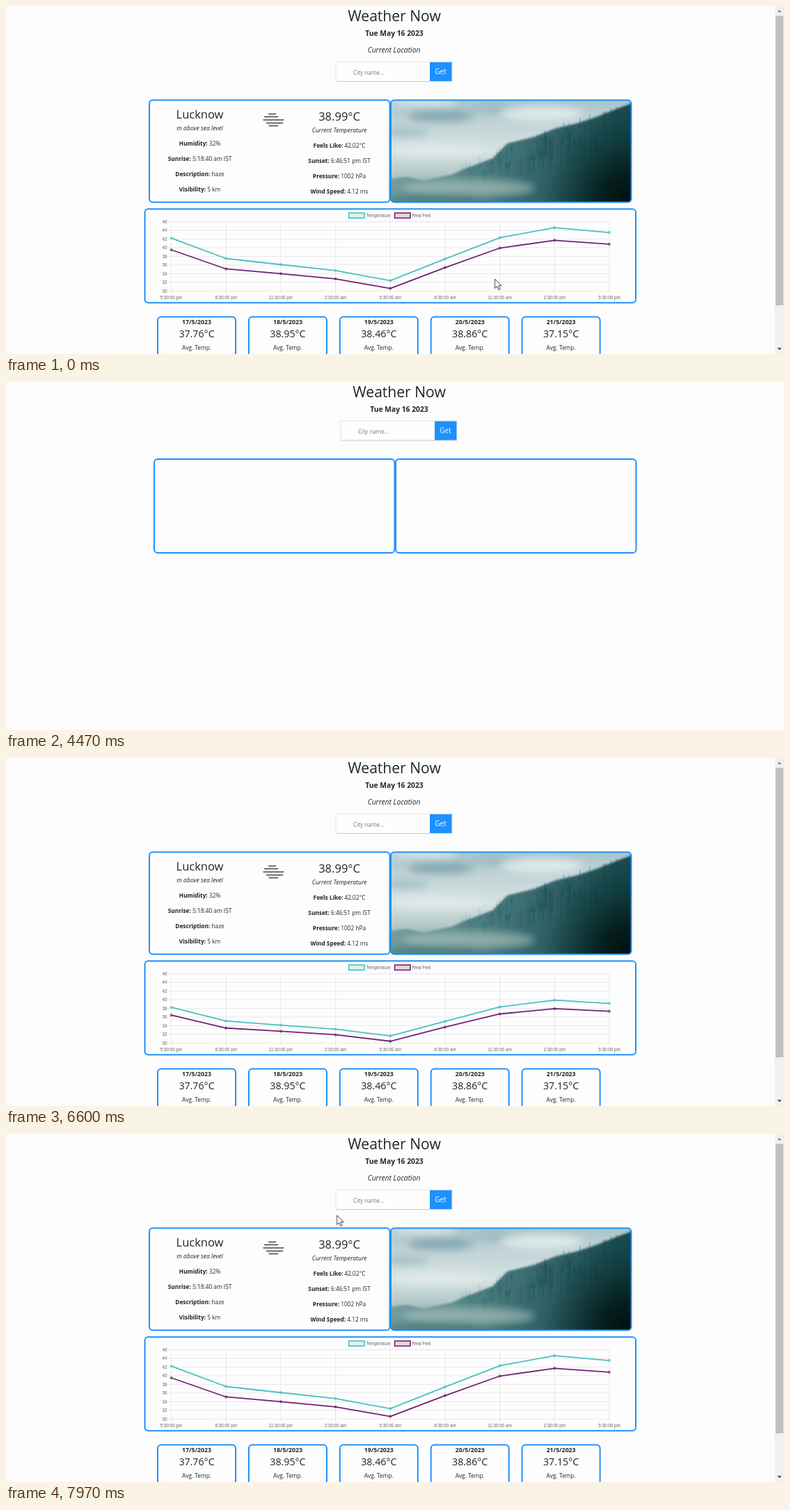
An HTML page that plays this animation: 1118 by 501 pixels, repeating every 8000 ms.

```html
<!DOCTYPE html>
<html lang="en">
<head>
<meta charset="utf-8">
<title>Weather Now</title>
<style>
  html, body { margin: 0; width: 100%; height: 100%; overflow: hidden; background: #fdfdfd; }
  svg { display: block; width: 1118px; height: 501px; }
  text { font: 8.3px "Open Sans", "Noto Sans", sans-serif; fill: #212529; text-anchor: middle; }
  .title { font-size: 21.1px; font-weight: 500; }
  .date { font-size: 10.3px; font-weight: 700; }
  .place { font-size: 10.3px; font-style: italic; }
  .hint { font-size: 8.1px; fill: #777; text-anchor: start; }
  .get { font-size: 10px; fill: #fff; }
  .big { font-size: 16.5px; font-weight: 500; }
  .sub { font-size: 8.6px; font-style: italic; }
  .bold { font-weight: 700; }
  .day { font-size: 8.7px; font-weight: 700; }
  .avg { font-size: 14.2px; font-weight: 500; }
  .tick { font: 6.3px "Liberation Sans", Arial, sans-serif; fill: #666; }
  .start { text-anchor: start; }
  .end { text-anchor: end; }
  .frame { fill: none; stroke: #1e90ff; stroke-width: 2; }
  .grid { fill: none; stroke: #dedede; stroke-width: .7; }
  .line { fill: none; stroke-width: 1.8; stroke-linejoin: round; }

  #page, #search, #blank, #photo, #pointer, .data, .late, #chart {
    animation: 8s step-end infinite;
  }
  #page { animation-name: shift; }
  #search { animation-name: lift; }
  #blank { animation-name: blank; }
  .data { animation-name: data; }
  #photo { animation-name: photo; }
  .late { animation-name: late; }
  #chart { animation-name: chart; }
  #pointer { animation-name: pointer; }

  @keyframes shift {
    0%, 77.875%, 100% { transform: none; }
    55.875% { transform: translateX(7px); }
  }
  @keyframes lift {
    0%, 59.625%, 100% { transform: none; }
    55.875% { transform: translateY(-24.5px); }
  }
  @keyframes blank {
    0%, 59.625%, 100% { opacity: 0; }
    55.875% { opacity: 1; }
  }
  @keyframes data {
    0%, 59.625%, 100% { opacity: 1; }
    55.875% { opacity: 0; }
  }
  @keyframes photo {
    0%, 60%, 100% { opacity: 1; }
    55.875% { opacity: 0; }
  }
  @keyframes late {
    0%, 77.875%, 100% { opacity: 1; }
    55.875% { opacity: 0; }
  }
  @keyframes chart {
    0%, 78.625%, 100% { opacity: 1; }
    55.875% { opacity: 0; }
  }
  @keyframes pointer {
    0% { opacity: 1; transform: translate(702.5px, 393px); }
    23.375% { opacity: 0; transform: translate(702.5px, 393px); }
    96.625% {
      opacity: 1; transform: translate(702.5px, 393px);
      animation-timing-function: cubic-bezier(.3, .3, .5, 1);
    }
    99.625%, 100% { opacity: 1; transform: translate(475.5px, 117px); }
  }
</style>
</head>
<body>
<svg viewBox="0 0 1118 501">
  <defs>
    <linearGradient id="sky" x2="0" y2="1">
      <stop offset="0" stop-color="#a9c4c9"/>
      <stop offset=".25" stop-color="#c3d5d8"/>
      <stop offset=".5" stop-color="#d6e2e2"/>
      <stop offset=".72" stop-color="#b3c9c8"/>
      <stop offset="1" stop-color="#5d8888"/>
    </linearGradient>
    <linearGradient id="wood" x2="1" y2=".15">
      <stop offset="0" stop-color="#84aaaa"/>
      <stop offset=".45" stop-color="#4c7e81"/>
      <stop offset="1" stop-color="#154448"/>
    </linearGradient>
    <radialGradient id="dark" gradientUnits="userSpaceOnUse" cx="897" cy="284" r="125">
      <stop offset="0" stop-color="#010b0b"/>
      <stop offset=".35" stop-color="#031817" stop-opacity=".85"/>
      <stop offset="1" stop-color="#0a2c2d" stop-opacity="0"/>
    </radialGradient>
    <filter id="soft" x="-30%" y="-60%" width="160%" height="220%"><feGaussianBlur stdDeviation="6"/></filter>
    <filter id="edge" x="-5%" y="-5%" width="110%" height="110%"><feGaussianBlur stdDeviation="1.6"/></filter>
    <clipPath id="crop"><rect x="553" y="135.5" width="345.5" height="147" rx="5"/></clipPath>
  </defs>

  <g id="page">
    <text class="title" x="558" y="22">Weather Now</text>
    <text class="date" x="558" y="43">Tue May 16 2023</text>
    <text class="place data" x="557.5" y="67">Current Location</text>

    <g id="search">
      <rect x="474" y="80.5" width="167" height="28" fill="#fefefe" stroke="#e2e2e8"/>
      <path d="M474 108.7H641" stroke="#c9cbd6"/>
      <rect x="609" y="81" width="31.5" height="27" fill="#1e90ff"/>
      <text class="hint" x="499" y="98.5">City name...</text>
      <text class="get" x="624.5" y="98.4">Get</text>
    </g>

    <g id="blank" class="frame">
      <rect x="206" y="111" width="345.5" height="135" rx="5"/>
      <rect x="553" y="111" width="345.5" height="135" rx="5"/>
    </g>

    <g id="photo" clip-path="url(#crop)">
      <rect x="553" y="135" width="346" height="148" fill="url(#sky)"/>
      <g filter="url(#soft)">
        <ellipse cx="625" cy="158" rx="48" ry="9" fill="#86a9b3"/>
        <ellipse cx="705" cy="148" rx="38" ry="6" fill="#9ab9c1"/>
        <ellipse cx="575" cy="182" rx="34" ry="6" fill="#a3bfc5"/>
        <ellipse cx="600" cy="138" rx="50" ry="6" fill="#dfe9ea"/>
        <ellipse cx="770" cy="155" rx="60" ry="10" fill="#dfe9e9"/>
        <ellipse cx="620" cy="208" rx="70" ry="11" fill="#dde7e6"/>
      </g>
      <g filter="url(#edge)">
        <path d="M548 250L575 246 600 251 640 243 660 234 700 219 720 198 760 188 790 176 820 169 850 159 880 147 905 138V290H548Z" fill="url(#wood)"/>
      </g>
      <g id="trees" fill="none" stroke="#174a4e"/>
      <ellipse cx="665" cy="262" rx="95" ry="13" fill="#b4cac5" opacity=".6" filter="url(#soft)"/>
      <ellipse cx="610" cy="280" rx="70" ry="8" fill="#426f70" opacity=".6" filter="url(#soft)"/>
      <rect x="770" y="150" width="130" height="134" fill="url(#dark)"/>
    </g>

    <g class="data">
      <rect class="frame" x="206" y="135.5" width="345.5" height="147" rx="5"/>
      <rect class="frame" x="553" y="135.5" width="345.5" height="147" rx="5"/>
      <path d="M377 155.5H388M371 159.5H391M369.5 164H399M374 168.5H398M377.5 172.5H391" stroke="#444" stroke-width="1.6"/>
      <g id="facts"></g>
    </g>

    <g class="late">
      <rect class="frame" x="199.5" y="292.3" width="705.5" height="135" rx="5"/>
      <g id="cards"></g>
      <rect x="1105" width="13" height="501" fill="#f1f1f1"/>
      <rect x="1106" y="14" width="11" height="417" fill="#c1c1c1"/>
      <path d="M1108.5 9L1111.5 5.5 1114.5 9Z" fill="#8a8a8a"/>
      <path d="M1108.5 492L1111.5 495.5 1114.5 492Z" fill="#505050"/>
    </g>

    <g id="chart">
      <g id="axes"></g>
      <g id="plot"></g>
    </g>
  </g>

  <path id="pointer" d="M0 0V13.5L3.2 10.6 5.3 15.6 7.6 14.6 5.5 9.7H9.6Z" fill="#fff" stroke="#222" stroke-width=".9"/>
</svg>

<script>
const $ = id => document.getElementById(id);
const text = (x, y, str, cls = "") => `<text class="${cls}" x="${x}" y="${y}">${str}</text>`;

// Weather details
const fact = (x, y, [name, value]) =>
  text(x, y, `<tspan class="bold">${name}:</tspan> ${value}`);
const column = (x, y, head, sub, rows) =>
  text(x, y, head, "big") + text(x, y + 17.3, sub, "sub") +
  rows.map((row, i) => fact(x, y + 39.3 + i * 21.9, row)).join("");

$("facts").innerHTML =
  column(278.5, 162, "Lucknow", "m above sea level", [
    ["Humidity", "32%"], ["Sunrise", "5:18:40 am IST"],
    ["Description", "haze"], ["Visibility", "5 km"]]) +
  column(479, 164.7, "38.99°C", "Current Temperature", [
    ["Feels Like", "42.02°C"], ["Sunset", "6:46:51 pm IST"],
    ["Pressure", "1002 hPa"], ["Wind Speed", "4.12 ms"]]);

// Daily averages
$("cards").innerHTML = [37.76, 38.95, 38.46, 38.86, 37.15].map((temp, i) => {
  const x = 218 + i * 130.9, mid = x + 56;
  return `<rect class="frame" x="${x}" y="447.5" width="112" height="80" rx="5"/>` +
    text(mid, 458.4, `${17 + i}/5/2023`, "day") +
    text(mid, 477, `${temp}°C`, "avg") +
    text(mid, 494.6, "Avg. Temp.");
}).join("");

// Misty trees
let seed = 11;
const rand = () => (seed = seed * 16807 % 2147483647) / 2147483647;
$("trees").innerHTML = Array.from({ length: 130 }, () => {
  const k = rand() ** .75, x = 655 + 244 * k;
  const y = 226 - 88 * k ** .8 + rand() * 30, h = 18 + 32 * k;
  return `<path d="M${x} ${y}l${rand() * 3 - 1.5} ${h}m-4 ${-h * .75}l4 7 4 -9" ` +
    `stroke-width="${.5 + rand() * .7}" opacity="${.15 + .45 * k}"/>`;
}).join("");

// Forecast chart
const left = 237.5, stepX = 78.68, base = 410.3, unit = 6.24;
const px = i => left + i * stepX;
const py = v => base - (v - 30) * unit;
const hours = ["5:30:00 pm", "8:30:00 pm", "11:30:00 pm", "2:30:00 am", "5:30:00 am",
  "8:30:00 am", "11:30:00 am", "2:30:00 pm", "5:30:00 pm"];
const series = [
  { name: "Temperature", color: "#4bc0c0", x: 492.5,
    data: [42.2, 37.5, 36.1, 34.7, 32.4, 37.4, 42.3, 44.6, 43.5] },
  { name: "Real Feel", color: "#6f2373", x: 558.5,
    data: [39.5, 35.1, 34, 32.8, 30.6, 35.4, 39.9, 41.7, 40.8] }
];

let axes = "";
for (let v = 30; v <= 46; v += 2) {
  axes += `<path class="grid" d="M233 ${py(v)}H${px(8)}"/>` + text(231.5, py(v) + 2.2, v, "tick end");
}
hours.forEach((hour, i) => {
  axes += `<path class="grid" d="M${px(i)} ${py(46)}V414.5"/>` + text(px(i), 422.3, hour, "tick");
});
for (const s of series) {
  axes += `<rect x="${s.x}" y="298" width="22.5" height="7.3" fill="${s.color}" fill-opacity=".18" stroke="${s.color}" stroke-width="1.6"/>` +
    text(s.x + 25, 303.7, s.name, "tick start");
}
$("axes").innerHTML = axes;

for (const s of [...series].reverse()) {
  $("plot").insertAdjacentHTML("beforeend", `<g stroke="${s.color}"><polyline class="line"/>` +
    s.data.map((_, i) => `<circle cx="${px(i)}" r="1.6" fill="${s.color}" fill-opacity=".3" stroke-width=".8"/>`).join("") + "</g>");
  s.group = $("plot").lastElementChild;
}

function drawChart(p) {
  for (const { data, group } of series) {
    const ys = data.map(v => base + (py(v) - base) * p);
    const [line, ...dots] = group.children;
    line.setAttribute("points", ys.map((y, i) => `${px(i)},${y}`).join(" "));
    dots.forEach((dot, i) => dot.setAttribute("cy", ys[i]));
  }
}

const LOOP = 8000, RELOAD = 4470, GROW = 6354;
let begin;
function tick(now) {
  begin ??= now;
  const t = (now - begin) % LOOP;
  const k = t < RELOAD ? 1 : Math.min(1, Math.max(0, (t - GROW) / 1000));
  drawChart(1 - (1 - k) ** 4);
  requestAnimationFrame(tick);
}
drawChart(1);
requestAnimationFrame(tick);
</script>
</body>
</html>
```
